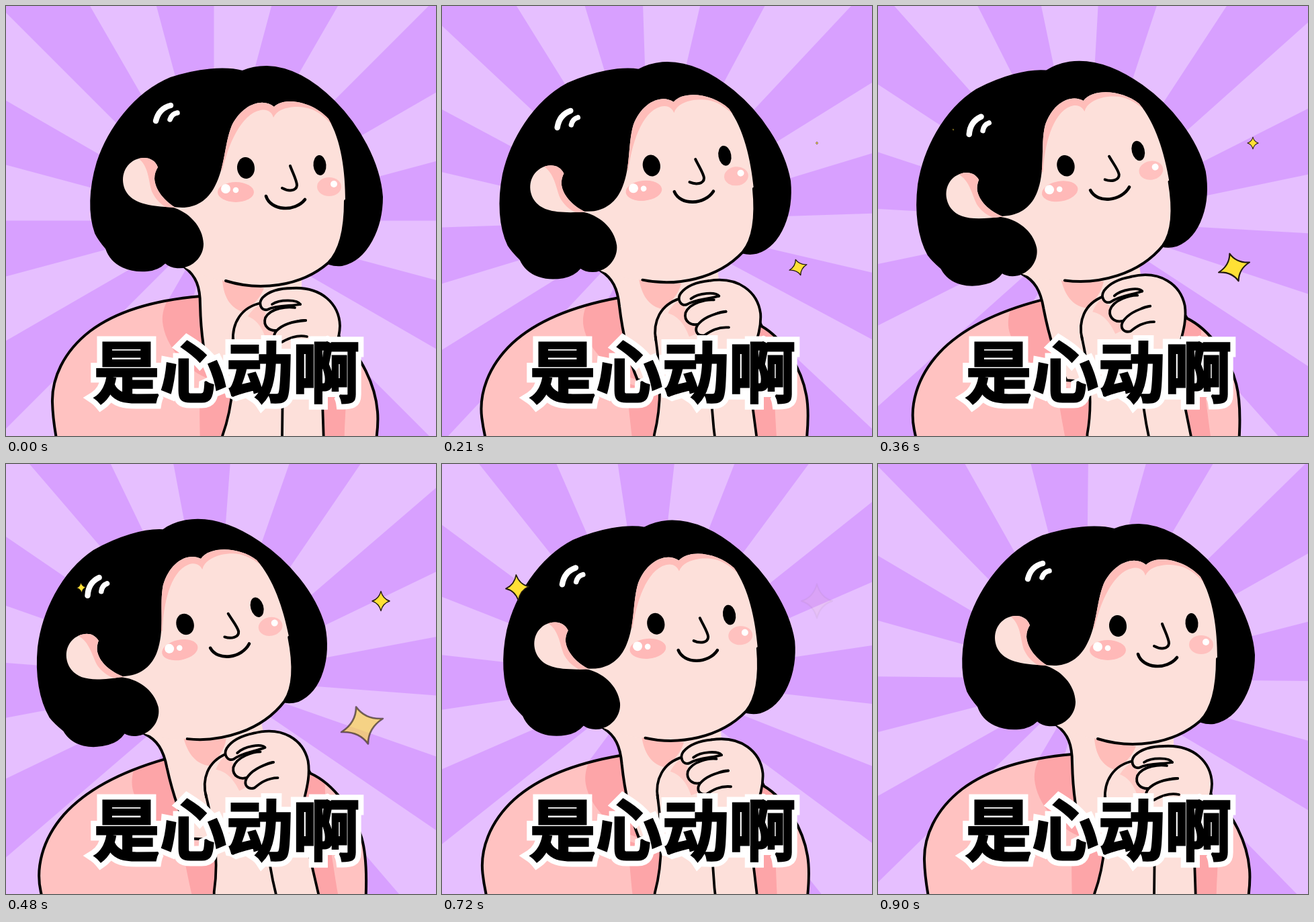
Animation, 640 px wide and 640 px high, one loop 930 ms. Source, as an HTML page with a canvas:

```html
<!DOCTYPE html>
<html lang="zh">
<head>
<meta charset="utf-8">
<style>
html, body { margin: 0; width: 100%; height: 100%; overflow: hidden; }
canvas { display: block; width: 640px; height: 640px; }
</style>
</head>
<body>
<canvas id="stage" width="640" height="640"></canvas>
<script>
const ctx = document.getElementById('stage').getContext('2d');
const STEP = 30, FRAMES = 31, RAD = Math.PI / 180;
const INK = '#000', SKIN = '#fde0da', ROBE = '#ffc2c1', ROBE_DARK = '#fda5a8', BLUSH = '#ffbdb9';
const LIGHT = '#e6bfff', DARK = '#d8a0ff';

const shape = d => new Path2D(d);

const body = shape('M289 432 C230 437 170 450 125 484 C85 515 68 555 69 590 C70 630 80 670 96 740 ' +
  'L530 740 C543 690 556 640 553 604 C550 565 528 517 497 495 L480 450 L340 420 Z');
const collar = shape('M241 437 L289 431 L292 500 L305 556 C270 545 236 505 233 470 C232 457 236 446 241 437 Z');
const sleeveShade = shape('M290 560 C286 590 290 630 289 740 L306 740 L336 580 Z');
const sideShade = shape('M490 490 L516 510 C506 560 505 600 500 740 L474 740 L470 560 Z');
const neck = shape('M255 375 C283 400 289 418 289 445 C290 490 297 530 305 556 L345 566 L440 480 L440 380 Z');
const neckLine = shape('M266 389 C283 402 289 418 289 445 C290 490 297 530 305 556 L345 566');
const chinShade = shape('M322 408 C324 436 336 450 352 455 C365 448 378 436 384 420 Z');
const hands = shape('M338 500 C336 472 350 448 382 442 C378 430 398 420 428 419 C470 419 496 444 497 476 ' +
  'C496 510 474 535 470 560 C471 600 473 640 476 740 L302 740 L322 640 C340 590 340 540 338 500 Z');
const handShade = shape('M360 462 C366 452 374 446 380 444 L390 466 L408 494 L388 500 C384 484 376 468 360 462 Z');
const handLines = [
  'M338 500 C336 472 350 448 380 442',
  'M425 420 C470 417 496 444 497 476 C496 510 474 535 470 560 C471 600 473 640 476 740',
  'M338 495 C340 540 340 590 322 640 L302 740',
  'M412 555 L411 640 L414 740'
].map(shape);
const fingers = [
  'M438 444 C423 447 403 445 389 452 C379 454 375 442 382 434 C392 424 408 420 426 420',
  'M446 468 C428 467 418 478 407 482 C392 486 382 476 386 464 C394 449 420 447 430 449',
  'M448 492 C432 489 420 495 411 500 C400 501 396 492 402 484 C412 473 430 469 446 468'
].map(shape);
const fingerFold = shape('M438 444 C434 437 408 436 396 444');

const hair = shape('M352 97 C325 90 285 94 245 107 C190 130 152 184 136 232 C124 272 123 310 133 338 ' +
  'C138 348 144 355 149 361 C158 388 186 396 210 394 C222 393 231 388 237 382 C247 391 262 391 275 386 ' +
  'L470 378 C480 386 490 387 500 386 C538 378 560 330 560 284 C556 232 525 178 489 142 ' +
  'C462 115 428 91 388 90 C374 90 361 93 352 97 Z');
const face = shape('M399 150 C382 136 352 146 336 178 C325 205 326 240 311 268 C300 290 282 300 262 300 ' +
  'L246 299 C272 306 293 328 294 354 C294 372 280 386 266 389 C285 400 305 406 327 409 ' +
  'C375 424 438 419 480 382 C500 362 505 325 505 290 C505 246 499 200 480 168 C458 143 415 134 399 150 Z');
const jaw = shape('M327 409 C375 424 438 419 480 382 C500 362 505 325 505 290');
const hairShade = shape('M322 245 C330 208 350 160 379 155 C390 153 396 159 398 166 C403 155 416 151 430 150 ' +
  'C454 150 468 157 486 178 L470 130 L340 130 L310 230 Z');
const ear = shape('M226 240 C221 226 206 223 192 229 C174 238 170 259 178 275 C188 293 209 298 252 300 ' +
  'C236 290 222 274 221 257 C221 250 223 245 226 240 Z');
const earShade = shape('M196 226 C214 238 212 266 218 278 C224 290 232 296 242 302 L260 302 L230 265 L232 222 Z');
const nose = shape('M423 238 C427 249 433 260 433 267 C432 276 420 276 411 271');
const mouth = shape('M387 283 C394 305 430 307 445 288');
const shineBig = shape('M223 171 C226 159 233 151 245 148');
const shineSmall = shape('M244 169 C246 163 249 160 255 159');

const stars = [
  { x: 530, y: 389, start: 0.5, size: 37, tilt: -18, wide: 1.06 },
  { x: 558, y: 204, start: 5.5, size: 24.5, tilt: 0, wide: 0.95 },
  { x: 112, y: 184, start: 11, size: 26, tilt: -5, wide: 0.95 }
];

function fill(path, color) {
  ctx.fillStyle = color;
  ctx.fill(path);
}

function stroke(path, width = 4, color = INK) {
  ctx.lineWidth = width;
  ctx.strokeStyle = color;
  ctx.stroke(path);
}

function oval(x, y, rx, ry, color, tilt = 0) {
  ctx.fillStyle = color;
  ctx.beginPath();
  ctx.ellipse(x, y, rx, ry, tilt, 0, Math.PI * 2);
  ctx.fill();
}

function clipped(path, draw) {
  ctx.save();
  ctx.clip(path);
  draw();
  ctx.restore();
}

function drawRays(frame) {
  ctx.fillStyle = DARK;
  ctx.fillRect(0, 0, 640, 640);
  ctx.fillStyle = LIGHT;
  ctx.beginPath();
  for (let i = 0; i < 12; i++) {
    const from = (i * 30 - 90 + frame * 4.02) * RAD;
    ctx.moveTo(309.5, 319.5);
    ctx.arc(309.5, 319.5, 700, from, from + 15 * RAD);
    ctx.closePath();
  }
  ctx.fill();
}

function drawBody() {
  fill(body, ROBE);
  clipped(body, () => {
    fill(sleeveShade, ROBE_DARK);
    fill(sideShade, ROBE_DARK);
  });
  fill(collar, ROBE_DARK);
  stroke(body);
  fill(neck, SKIN);
  fill(chinShade, BLUSH);
  stroke(neckLine);
}

function drawHands() {
  fill(hands, SKIN);
  fill(handShade, '#ffc9c4');
  handLines.forEach(line => stroke(line, 3.8));
  for (const finger of fingers) {
    fill(finger, SKIN);
    stroke(finger, 3.8);
  }
  stroke(fingerFold, 3.8);
}

function drawHead() {
  fill(hair, INK);
  stroke(hair, 2);
  fill(face, SKIN);
  clipped(face, () => {
    fill(hairShade, BLUSH);
    oval(342, 277, 27, 15, '#ffb9b8');
    oval(481, 269, 18, 14, '#ffc1bf');
  });
  stroke(jaw);
  fill(ear, SKIN);
  clipped(ear, () => fill(earShade, BLUSH));

  oval(327, 272, 7, 7, '#fff');
  oval(342, 274, 4.3, 4.3, '#fff');
  oval(488, 265, 5, 5, '#fff');
  oval(357, 241, 13, 16, INK, -0.1);
  oval(467, 237, 9.5, 15, INK, -0.08);
  stroke(nose);
  stroke(mouth, 4.6);
  stroke(shineBig, 8.5, '#fff');
  stroke(shineSmall, 7.5, '#fff');
}

// The whole figure sways around a point below the stage.
function drawFigure(frame) {
  const sway = 1 - Math.abs(frame - 15) / 15;
  ctx.save();
  ctx.translate(299, 701);
  ctx.rotate(-12 * RAD * sway);
  ctx.translate(-299, -701);
  ctx.lineCap = ctx.lineJoin = 'round';
  drawBody();
  drawHead();
  drawHands();
  ctx.restore();
}

function drawStar({ x, y, start, size, tilt, wide }, frame) {
  const life = 18.7, age = frame - start;
  if (age <= 0 || age >= life) return;
  const r = size * age / life, inner = r * 0.3;
  ctx.save();
  ctx.globalAlpha = Math.min(1, (life - age) / 5.3);
  ctx.translate(x, y);
  ctx.rotate(tilt * RAD);
  ctx.scale(wide, 1 / wide);
  ctx.beginPath();
  ctx.moveTo(0, -r);
  for (let i = 0; i < 4; i++) {
    const a = i * Math.PI / 2, d = inner * Math.SQRT2 * 0.75;
    ctx.quadraticCurveTo(d * Math.sin(a + Math.PI / 4), -d * Math.cos(a + Math.PI / 4),
      r * Math.cos(a), r * Math.sin(a));
    ctx.rotate(0);
  }
  ctx.closePath();
  ctx.fillStyle = '#ffe035';
  ctx.fill();
  ctx.lineWidth = Math.min(2.6, 0.3 + r * 0.08);
  ctx.strokeStyle = '#221a10';
  ctx.lineJoin = 'round';
  ctx.stroke();
  ctx.restore();
}

function drawCaption() {
  const caption = '是心动啊';
  ctx.font = '900 99px "Noto Sans CJK SC", "Noto Sans CJK", sans-serif';
  ctx.textAlign = 'left';
  ctx.textBaseline = 'alphabetic';
  ctx.lineJoin = 'miter';
  ctx.miterLimit = 2;
  ctx.lineWidth = 19;
  ctx.strokeStyle = '#fff';
  ctx.strokeText(caption, 130, 582);
  ctx.lineWidth = 3;
  ctx.strokeStyle = ctx.fillStyle = INK;
  ctx.strokeText(caption, 130, 582);
  ctx.fillText(caption, 130, 582);
}

const begin = performance.now();

function render() {
  const frame = Math.floor((performance.now() - begin) / STEP) % FRAMES;
  drawRays(frame);
  drawFigure(frame);
  stars.forEach(star => drawStar(star, frame));
  drawCaption();
  requestAnimationFrame(render);
}
render();
</script>
</body>
</html>
```
